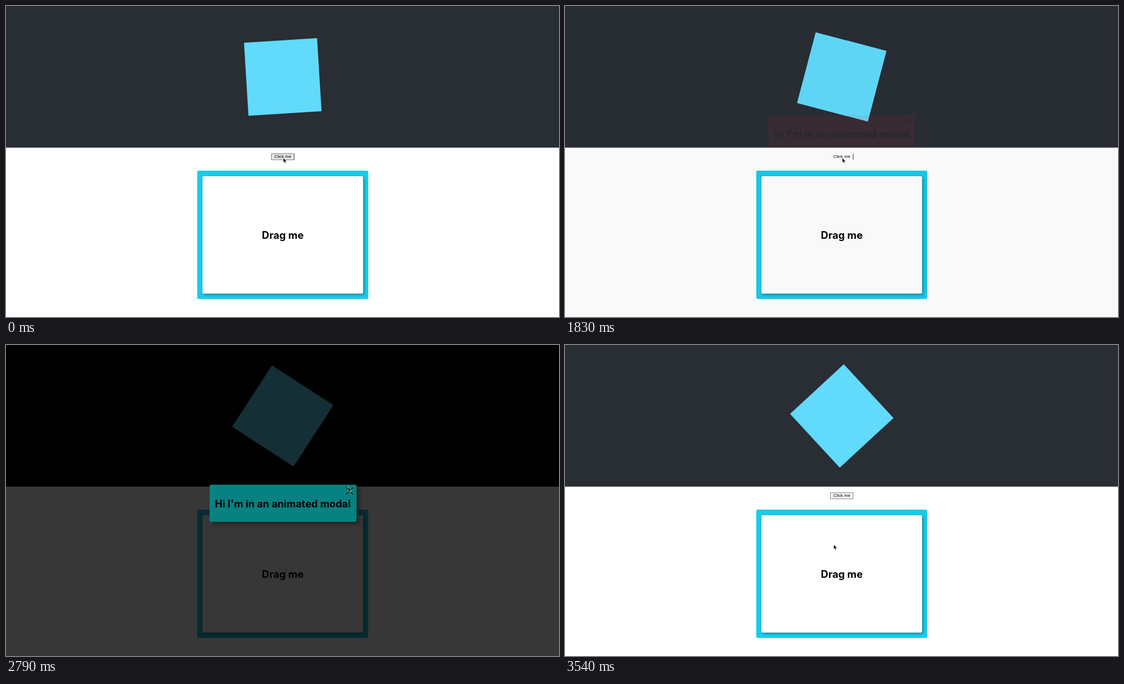
Animation of 997 by 561 pixels, one loop 4440 ms. Source, as an HTML page:

```html
<!DOCTYPE html>
<html lang="en">
<head>
<meta charset="utf-8">
<title>Animated modal</title>
<style>
html, body { margin: 0; width: 100%; height: 100%; overflow: hidden; background: #fff; }
body > *, #close { position: absolute; box-sizing: border-box; }
h2 { margin: 0; font: 700 18.3px Inter, sans-serif; color: #000; text-align: center; white-space: nowrap; }
#page { left: 0; top: 0; width: 997px; height: 561px; }
#page text { font: 700 18.5px Inter, sans-serif; text-anchor: middle; }
#card { filter: drop-shadow(2px 2px 2px rgba(0, 0, 0, .35)); }
#spinner { left: 433px; top: 62px; width: 132px; height: 132px; background: #61dafb; }
#button {
  left: 478px; top: 265.5px; width: 42px; height: 12.5px; border: 1px solid; border-radius: 1px;
  font: 8px/10.5px "Liberation Sans", Arial, sans-serif; text-align: center; white-space: nowrap;
}
.hover { background: #e6e6e6; border-color: #808080 #333 #808080 #808080 !important; }
.pressed { border-color: transparent #333 transparent transparent !important; }
.idle { background: #f2f2f2; border-color: #858585 !important; }
#shade { inset: 0; background: #000; }
#modal { left: 366.5px; top: 250.5px; width: 265px; height: 67.5px; border-radius: 3px; }
#modal h2 { line-height: 69px; }
#close { left: 246px; top: 5px; width: 13px; height: 13px; }
#cursor { left: 0; top: 0; width: 8px; height: 12px; overflow: visible; }
</style>
</head>
<body>
<svg id="page" viewBox="0 0 997 561">
  <rect id="head" width="997" height="255.5"/>
  <rect x="344.8" y="297.1" width="308.4" height="231.5" rx="3" fill="#1acbe8"/>
  <rect id="card" x="354.2" y="306.9" width="289.6" height="211.8" rx="2" fill="#fff"/>
  <text x="499" y="420">Drag me</text>
</svg>
<div id="spinner"></div>
<div id="button">Click me</div>
<div id="shade"></div>
<div id="modal">
  <div id="content">
    <h2>Hi I'm in an animated modal</h2>
    <svg id="close" viewBox="0 0 13 13"><path d="M0 0 13 13M13 0 0 13" stroke="#000" stroke-width="1.2"/></svg>
  </div>
</div>
<svg id="cursor" viewBox="0 0 8 12">
  <path d="M0 0V8.5L2 6.8 3.3 9.7 4.7 9.1 3.5 6.3H6Z" fill="#000" stroke="#fff" stroke-width=".6"/>
</svg>
<script>
const LOOP = 4440, TICK = 30;
const ENTER = 1800, FADE_TIME = 300, DROP_TIME = 285, EXIT = 2760, EXIT_TIME = 385;
const RED = [255, 40, 50], GREY = [110, 135, 140], TEAL = [0, 128, 128], PINK = [203, 166, 169];
const $ = id => document.getElementById(id);
const [head, spinner, button, shade, modal, content, cursor] =
  ["head", "spinner", "button", "shade", "modal", "content", "cursor"].map($);

const clamp = x => Math.min(1, Math.max(0, x));
const ease = (t, start, time) => {
  const x = clamp((t - start) / time);
  return x * x * (3 - 2 * x);
};
const mix = (a, b, k) => a.map((v, i) => v + (b[i] - v) * k);
const rgb = c => `rgb(${c.map(Math.round)})`;

function enterColor(p) {
  return p < .65 ? mix(RED, GREY, p / .65) : mix(GREY, TEAL, (p - .65) / .35);
}

function drawModal(t, shown, gone) {
  const leaving = gone > 0, level = shown - gone;
  // The modal drops in from 10vh above and leaves 10vh below.
  const y = 56 * (ease(t, ENTER, DROP_TIME) - 1 + gone);
  modal.style.transform = `translateY(${y}px)`;
  modal.style.opacity = level <= 0 ? 0 : leaving ? 1 - gone ** 4 : .08 + .92 * shown * shown;
  modal.style.background = rgb(leaving ? mix(TEAL, PINK, clamp(gone * 1.9)) : enterColor(shown));
  modal.style.boxShadow = `5px 5px 7px rgba(0, 0, 0, ${.35 * shown ** 3 * level})`;
  modal.style.clipPath = shown < .1 ? `inset(0 0 ${62.5 + y}px 0)` : "none";
  content.style.opacity = (1 - gone) ** 1.4;
}

function draw(t) {
  const shown = ease(t, ENTER, FADE_TIME), gone = ease(t, EXIT, EXIT_TIME);
  const level = shown - gone;

  head.style.fill = rgb(mix([41, 45, 52], [0, 0, 0], level * level));
  spinner.style.transform = `rotate(${-3.5 + (t - 870) * .019}deg)`;
  button.className = t < ENTER ? "hover" : t < EXIT ? "pressed" : "idle";
  shade.style.opacity = .8 * level;
  drawModal(t, shown, gone);

  const toClose = mix([500, 274], [617, 256], ease(t, 2130, 420));
  const [cx, cy] = mix(toClose, [484.5, 360], ease(t, 2880, 500));
  cursor.style.transform = `translate(${cx}px, ${cy}px)`;
}

const began = performance.now();
function frame() {
  const t = (performance.now() - began) % LOOP;
  draw(Math.min(3540, Math.max(870, Math.floor(t / TICK) * TICK)));
  requestAnimationFrame(frame);
}
frame();
</script>
</body>
</html>
```
